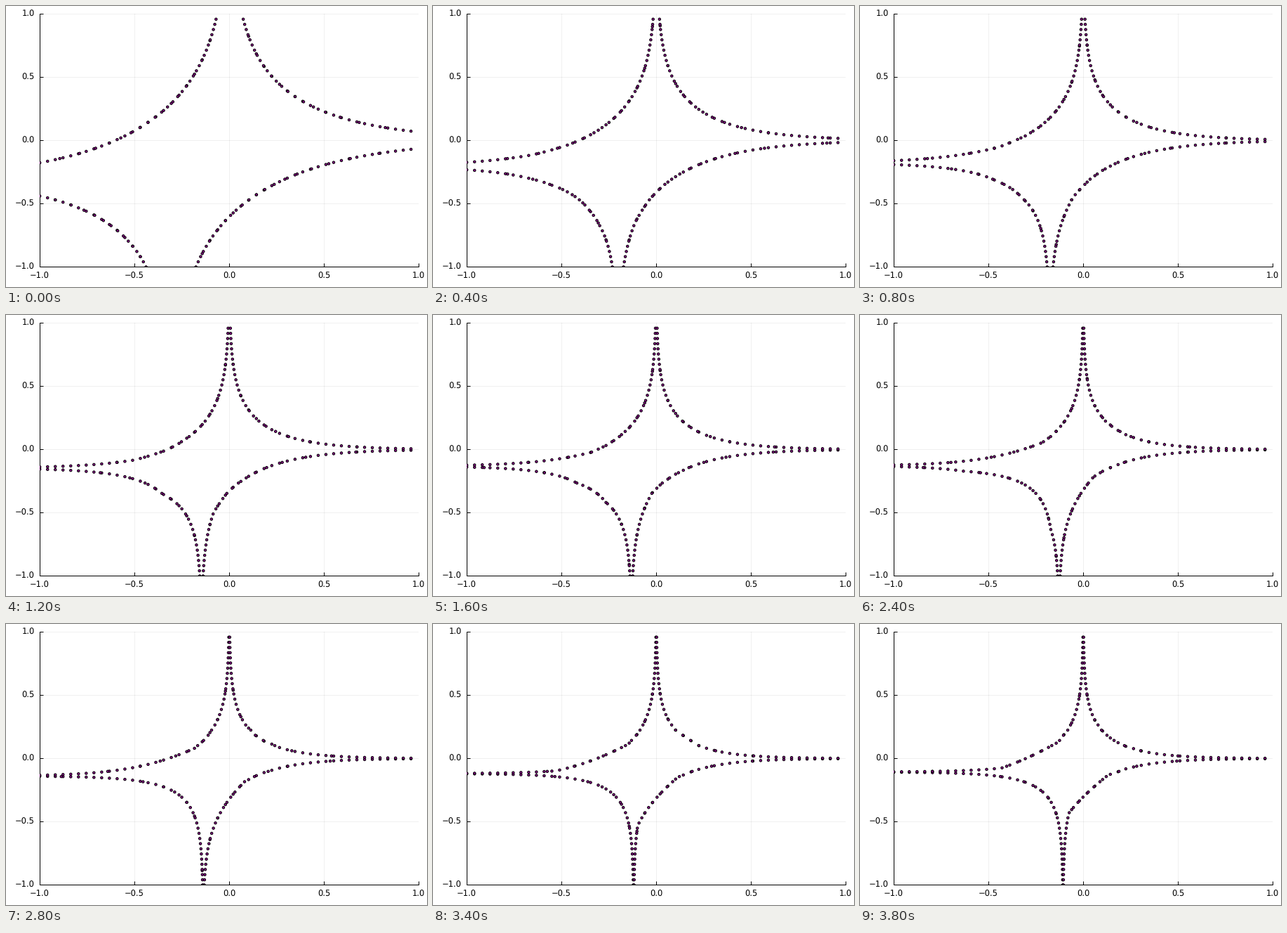
Recreate the animation shown at these times as a matplotlib script. Size 600 px wide and 400 px high, loop 4 s.

```python
import numpy as np
import matplotlib.pyplot as plt
from matplotlib.animation import FuncAnimation

W, H, DPI = 600, 400, 100
LEFT, RIGHT, TOP, BOTTOM = 48.2, 588.2, 11.45, 371.45
FRAMES, INTERVAL = 20, 200
PX = 72 / DPI

LEVELS = np.linspace(-1, 1, 50)[:-1]
TICKS = np.linspace(-1, 1, 5)


def curve(x):
    """Hyperbola (1 + x)(1 + y) = 1.5, its own inverse."""
    return 1.5 / (1 + x) - 1


def branch(t, side):
    """Vertices where one branch crosses the lines of a 300 x 300 grid."""
    g = np.linspace(-t, t, 300)
    g = g[(g + 1) * side > 0]
    x = np.concatenate([g, curve(g)])
    y = np.concatenate([curve(g), g])
    keep = (abs(x) <= t * 1.0001) & (abs(y) <= t * 1.0001)
    x, y = x[keep], y[keep]
    order = np.argsort(x)
    return x[order], y[order]


def amoeba(t):
    """Log-scaled points of the polyline on the lines of the log grid."""
    v = np.concatenate([t ** LEVELS, -t ** LEVELS])
    found = []
    for side in (1, -1):
        x, y = branch(t, side)
        found.append((v, np.interp(v, x, y, np.nan, np.nan)))
        found.append((np.interp(v, y[::-1], x[::-1], np.nan, np.nan), v))
    pts = np.hstack([np.array(p) for p in found]).T
    pts = pts[np.isfinite(pts).all(axis=1)]
    return np.log(np.maximum(abs(pts), 1e-12)) / np.log(t)


plt.rcParams["font.family"] = "DejaVu Sans"
plt.rcParams["text.hinting"] = "none"
fig = plt.figure(figsize=(W / DPI, H / DPI), dpi=DPI, facecolor="white")
ax = fig.add_axes([LEFT / W, 1 - BOTTOM / H,
                   (RIGHT - LEFT) / W, (BOTTOM - TOP) / H])
ax.set(xlim=(-1, 1), ylim=(-1, 1), xticks=TICKS, yticks=TICKS)
ax.set_axisbelow(True)
labels = [f"{v:.1f}".replace("-", "\u2212") for v in TICKS]
ax.set_xticklabels(labels)
ax.set_yticklabels(labels)
ax.tick_params(direction="in", length=5.4 * PX, width=PX, labelsize=8.3)
ax.tick_params(axis="x", pad=7 * PX)
ax.tick_params(axis="y", pad=7.5 * PX)
for label in ax.get_yticklabels():
    label.set_verticalalignment("center")
for name, spine in ax.spines.items():
    spine.set_linewidth(PX)
    spine.set_visible(name in ("left", "bottom"))
for v in TICKS:
    for line in (ax.axvline, ax.axhline):
        line(v, color="black", alpha=0.06, lw=PX, zorder=0.5)

dots = ax.scatter([], [], s=(3.5 * PX) ** 2, facecolor="purple",
                  edgecolor="black", zorder=3)
# two equal widths keep the dots at sub-pixel positions
dots.set_linewidth([0.9 * PX, 0.9 * PX])


def draw(i):
    dots.set_offsets(amoeba(10.0 * (i + 1)))
    return (dots,)


anim = FuncAnimation(fig, draw, frames=FRAMES, interval=INTERVAL,
                     repeat=True, repeat_delay=0)
plt.show()
```
